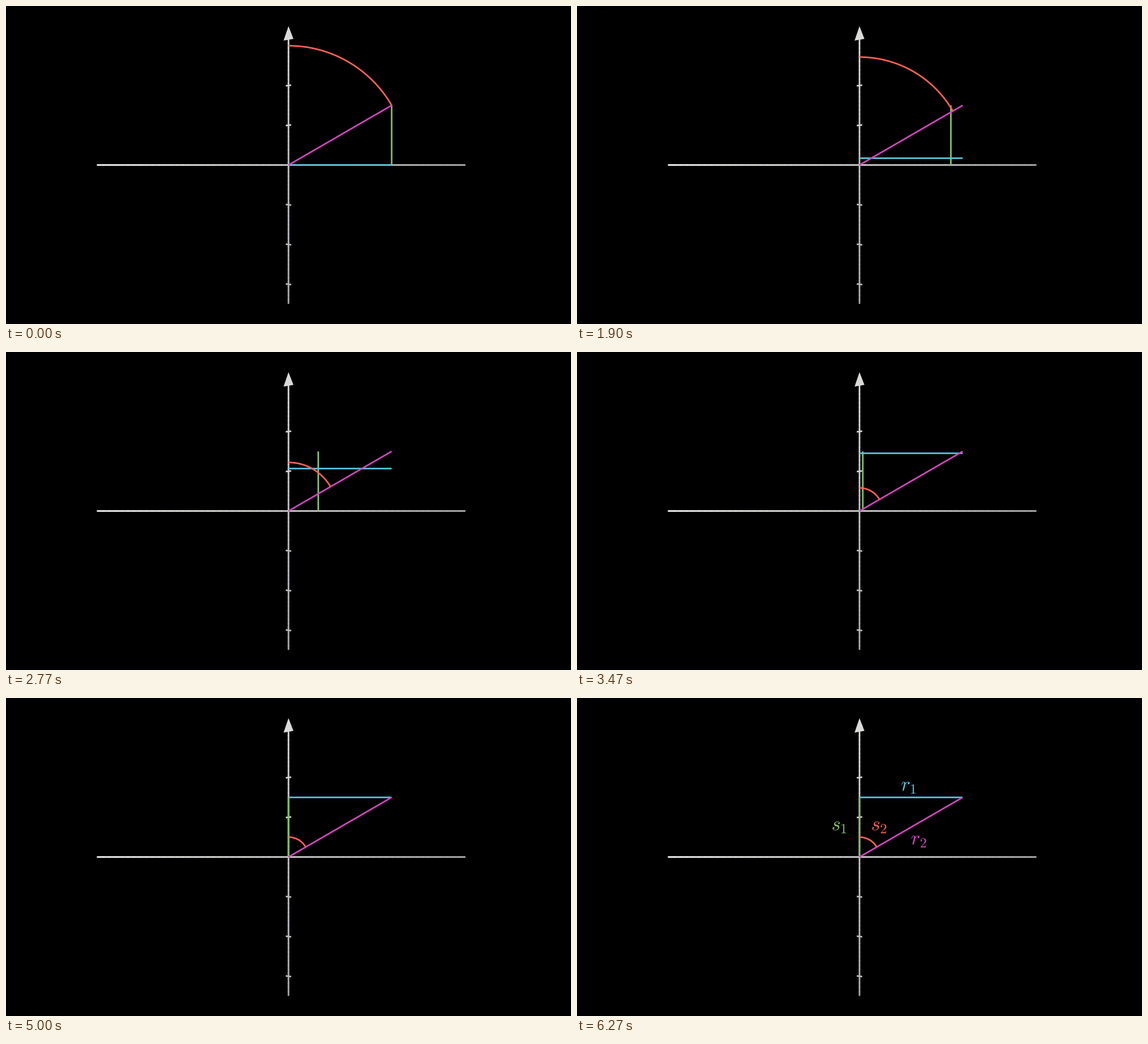
Animation, 998 px wide and 561 px high, one loop 8010 ms. Source, as a matplotlib script:

```python
import math

import numpy as np
import matplotlib.pyplot as plt
from matplotlib.animation import FuncAnimation
from matplotlib.collections import LineCollection
from matplotlib.colors import LinearSegmentedColormap, to_rgba
from matplotlib.patches import PathPatch, Polygon
from matplotlib.path import Path
from matplotlib.textpath import TextPath

W, H, DPI = 998, 561, 64
STEP, FRAMES, FPS = 30, 267, 30
PX = 72 / DPI                      # one pixel in points
UNIT = H / 8
CX, CY = W / 2, H / 2
STROKE = 0.04 * UNIT
EM = UNIT / 2

BLUE, GREEN, RED, PINK = "#58C4DD", "#83C167", "#FC6255", "#D147BD"
END_X, END_Y = 3 * np.cos(np.pi / 6), 1.5

plt.rcParams["mathtext.fontset"] = "cm"
plt.rcParams["path.snap"] = False  # keep sub-pixel positions
fig = plt.figure(figsize=(W / DPI, H / DPI), dpi=DPI, facecolor="black")
ax = fig.add_axes([0, 0, 1, 1])
ax.set(xlim=(0, W), ylim=(H, 0))
ax.axis("off")


def shaded_line(start, end, colors, parts=60):
    """Straight line whose colour runs through the given stops."""
    start, end = np.array(start, float), np.array(end, float)
    edges = np.linspace(0, 1, parts + 1)
    overlap = 0.15 / parts
    segments = [(start + (end - start) * a,
                 start + (end - start) * min(b + overlap, 1))
                for a, b in zip(edges[:-1], edges[1:])]
    shades = LinearSegmentedColormap.from_list("shade", colors)(
        (edges[:-1] + edges[1:]) / 2)
    ax.add_collection(LineCollection(segments, colors=shades, snap=False,
                                     linewidths=STROKE * PX, zorder=1))


def draw_axes():
    shaded_line((160.5, CY), (811.5, CY),
                ["#f4f4f4", "#e0e0dc", "#cdcdcb", "#c0c0be", "#acacac"])
    shaded_line((CX, 58), (CX, 525.5),
                ["#dcdcda", "#d0d0d0", "#c4c4c8", "#babac0", "#acacae"])
    for k in (2, 1, -1, -2, -3):
        y = CY - k * UNIT
        tilt = 0.6 if k > 0 else -0.6
        shade = "#d4d4d2" if k > 0 else "#bcbcbe"
        ax.plot([CX - 4.8, CX + 4.8], [y + tilt, y - tilt], color=shade,
                lw=STROKE * PX, solid_capstyle="butt", zorder=1)
    ax.add_patch(Polygon([(CX, 35.5), (CX - 8.7, 61), (CX + 8.7, 58)],
                         fc="#dadad8", ec="none", zorder=1))


def stroke(color, zorder):
    return ax.plot([], [], color=color, lw=STROKE * PX, snap=False,
                   solid_capstyle="butt", zorder=zorder)[0]


def smooth(u):
    sigmoid = lambda v: 1 / (1 + np.exp(-v))
    low = sigmoid(-5)
    u = np.clip(u, 0, 1)
    return np.clip((sigmoid(10 * (u - 0.5)) - low) / (1 - 2 * low), 0, 1)


class Glyph:
    """A letter that is outlined first and then filled."""

    def __init__(self, text, size, left, baseline, color, delay):
        path = TextPath((0, 0), f"${text}$", size=size)
        verts = path.vertices * [1, -1]
        outline = Path(verts, path.codes).to_polygons()[0]
        shift = np.array([left - outline[:, 0].min(), baseline])
        self.path = Path(verts + shift, path.codes)
        lengths = np.hypot(*np.diff(outline, axis=0).T)
        along = np.r_[0, np.cumsum(lengths)]
        even = np.linspace(0, along[-1], 160)
        self.outline = np.column_stack(
            [np.interp(even, along, outline[:, i]) for i in (0, 1)]) + shift
        self.color, self.delay = color, delay
        self.patch = ax.add_patch(PathPatch(self.path, ec=color, fc="none",
                                            zorder=6))

    def write(self, u):
        u = np.clip(u * 1.2 - self.delay, 0, 1)
        self.patch.set_visible(u > 0)
        if u < 0.5:
            count = max(2, int(2 * u * len(self.outline)))
            self.patch.set_path(Path(self.outline[:count]))
            fill = 0
        else:
            self.patch.set_path(self.path)
            fill = 2 * u - 1
        self.patch.set_facecolor(to_rgba(self.color, fill))
        self.patch.set_edgecolor(self.color if fill < 1 else "none")
        self.patch.set_linewidth(0.02 * UNIT * (1 - fill) * PX)


def label(letter, index, left, sub_left, baseline, color):
    return [Glyph(letter, EM, left, baseline, color, 0),
            Glyph(index, 0.7 * EM, sub_left, baseline + 0.15 * EM, color, 0.2)]


draw_axes()
green, blue, pink, red = (stroke(c, z) for z, c in
                          enumerate((GREEN, BLUE, PINK, RED), 2))
pink.set_data([CX, CX + END_X * UNIT], [CY, CY - END_Y * UNIT])
sweep = np.linspace(np.pi / 2, np.pi / 6, 80)
glyphs = (label("r", "1", 573.3, 589.8, 163.4, BLUE)
          + label("s", "1", 451.3, 467, 233.4, GREEN)
          + label("s", "2", 521.3, 536.5, 233.4, RED)
          + label("r", "2", 590.8, 606.8, 258.4, PINK))


def scene_time(i):
    """Seconds on the scene's 30 fps clock, read late in each frame's slot."""
    return math.floor((i + 2 / 3) * STEP * FPS / 1000) / FPS


def update(i):
    t = scene_time(i)
    move = smooth((t - 1) / 3)
    x = CX + END_X * UNIT * (1 - move)
    y = CY - END_Y * UNIT * move
    radius = (3 - 2.5 * move) * UNIT
    green.set_data([x, x], [CY, CY - END_Y * UNIT])
    blue.set_data([CX, CX + END_X * UNIT], [y, y])
    red.set_data(CX + radius * np.cos(sweep), CY - radius * np.sin(sweep))
    for glyph in glyphs:
        glyph.write(t - 5)
    return [green, blue, red] + [g.patch for g in glyphs]


animation = FuncAnimation(fig, update, frames=FRAMES, interval=STEP,
                          repeat=True, repeat_delay=0, blit=False)
plt.show()
```
